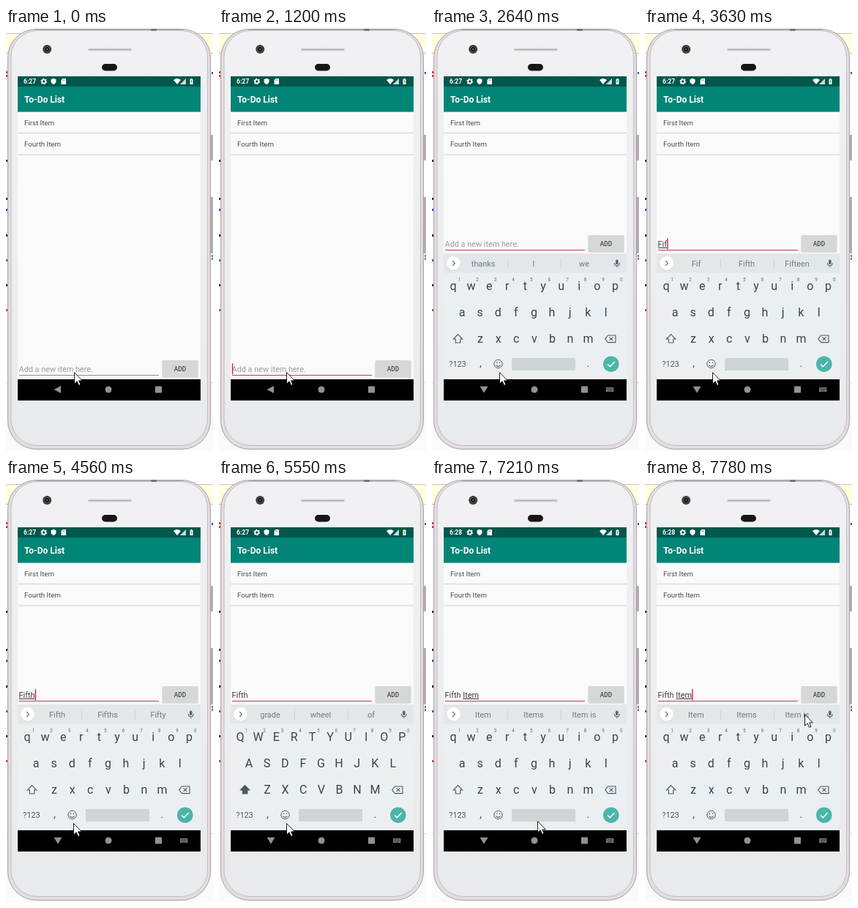
Write an HTML page that moves like this. It is 283 px wide and 578 px high and loops after 8000 ms.

```html
<!DOCTYPE html>
<html lang="en">
<head>
<meta charset="utf-8">
<title>To-do list on a phone</title>
<style>
  html, body { margin: 0; width: 100%; height: 100%; overflow: hidden; background: #fff; }
  svg { display: block; width: 100%; height: 100%; font-family: Roboto, "Open Sans", sans-serif; }
  text { white-space: pre; }
  .mid { text-anchor: middle; }
  .word { text-decoration: underline; }
</style>
</head>
<body>
<svg id="stage" viewBox="0 0 283 578">
  <defs>
    <linearGradient id="shell" x2="0" y2="1">
      <stop offset="0" stop-color="#f1f1f3"/>
      <stop offset="1" stop-color="#e8eaec"/>
    </linearGradient>
  </defs>

  <!-- page behind the phone -->
  <rect y="8" width="283" height="26" fill="#ffffdf"/>
  <path d="M0 7.5H283M0 34.5H283" stroke="#c4c1c1"/>
  <rect y="485" width="283" height="93" fill="#fafafb"/>
  <path d="M0 484.5H283" stroke="#d8d8da"/>
  <g id="scraps"></g>

  <!-- phone -->
  <path d="M281.500 146V181M281.500 231V308" stroke="#b3adb1" stroke-width="3"/>
  <rect x="2.500" y="1.500" width="277" height="574" rx="39" fill="#e2dde0" stroke="#a79fa4"/>
  <rect x="7" y="3.500" width="268.500" height="567" rx="36" fill="url(#shell)" stroke="#c4bcc1"/>
  <path d="M40 2.500H243" stroke="#b4adb1"/>
  <rect x="198" y="1" width="8" height="3" rx="1" fill="#77747a"/>
  <circle cx="56.200" cy="29" r="6" fill="#3a3a3d"/>
  <circle cx="56.200" cy="29" r="3.600" fill="#151519" stroke="#63636a" stroke-width=".8"/>
  <circle cx="56.200" cy="29" r="1.200" fill="#5b6070"/>
  <rect x="112" y="27.500" width="60" height="4" rx="2" fill="#d4d3d6"/>
  <path d="M113 29.500H171" stroke="#aaa9ae"/>
  <rect x="131" y="49" width="21" height="9.500" rx="4.700" fill="#161618"/>

  <!-- app -->
  <rect x="16" y="66" width="250" height="443" fill="#fafafa"/>
  <rect x="16" y="80" width="250" height="34.600" fill="#008577"/>
  <rect x="16" y="66" width="250" height="14" fill="#00574b"/>
  <text id="clock" x="24" y="76" font-size="8.500" font-weight="700" fill="#fff"></text>
  <g fill="#fff">
    <circle cx="51.700" cy="73" r="2.500" fill="none" stroke="#fff" stroke-width="1.700"/>
    <circle cx="51.700" cy="73" r="3.700" fill="none" stroke="#fff" stroke-width="1.200" stroke-dasharray="1.900 1.970"/>
    <path d="M65 68.800l3.500 1.400v2.600q0 3-3.500 4.400q-3.500-1.400-3.500-4.400v-2.600z"/>
    <path d="M77.500 69H82v8h-6.500v-6z"/>
    <path d="M229 71q5-3.800 10 0l-5 6z"/>
    <path d="M246 69v8h-8z" opacity=".8"/>
    <path d="M251.500 70h1v-1h2v1h1v7h-4z"/>
  </g>
  <path d="M78 70.300v1.500M79.500 70.300v1.500M253.500 71.500v3" stroke="#00574b" stroke-width=".8"/>
  <text x="25" y="102" font-size="12" font-weight="700" fill="#fff">To-Do List</text>
  <g font-size="9.700" fill="#4b4b4b">
    <text x="25" y="132.500">First Item</text>
    <text x="25" y="162.300">Fourth Item</text>
  </g>
  <path d="M16 143.500H266M16 173.200H266" stroke="#d9d9d9" stroke-width="1.300"/>

  <g id="entry">
    <text id="hint" x="17.600" y="469.800" font-size="10.850" fill="#9b9b9b">Add a new item here.</text>
    <text id="typed" x="17.600" y="469.800" font-size="10.850" fill="#3c3c3c"><tspan id="done"></tspan><tspan id="word" class="word"></tspan></text>
    <path id="line" d="M18 474.500H209"/>
    <rect id="caret" y="458.300" width="1.400" height="15" fill="#d81b60"/>
    <rect x="213.500" y="454.800" width="49" height="23" rx="1.500" fill="#bdbdbd" opacity=".6"/>
    <rect x="213.500" y="454" width="49" height="23" rx="1.500" fill="#d6d7d7"/>
    <text class="mid" x="238" y="468.900" font-size="8.300" font-weight="500" fill="#444">ADD</text>
  </g>

  <!-- navigation bar -->
  <rect x="16" y="480" width="250" height="29" fill="#000"/>
  <g fill="#929292">
    <path id="back" d="M65.500 494l9.500-5v10z"/>
    <path id="down" d="M65.500 489.800h11l-5.500 9z"/>
    <circle cx="140" cy="494" r="4.500"/>
    <rect x="204" y="489.500" width="9" height="9" rx=".6"/>
    <g id="switcher">
      <rect x="238" y="491" width="10.500" height="6" rx=".6" fill="#777"/>
      <path d="M239.200 492.700h8.500M239.200 494.200h8.500M241 495.800h4.500" stroke="#000" stroke-width=".7" stroke-dasharray="1 .6"/>
    </g>
  </g>

  <g id="board">
    <rect x="16" y="308" width="250" height="172" fill="#eceff1"/>
    <rect x="16" y="308" width="250" height="26.500" fill="#e4e7e9"/>
    <circle cx="29.500" cy="322" r="9.500" fill="#d5d8da"/>
    <circle cx="29.500" cy="321.400" r="9.300" fill="#fff"/>
    <path d="M28 318l3.300 3.400l-3.300 3.400" fill="none" stroke="#5d666b" stroke-width="1.100"/>
    <path d="M103.500 315v14M176.500 315v14" stroke="#d0d4d6"/>
    <g id="tips" class="mid" font-size="10.900" fill="#70797e"></g>
    <rect x="251" y="316.500" width="3.600" height="6.500" rx="1.800" fill="#5d666b"/>
    <path d="M249.300 321q0 3.700 3.500 3.700t3.500-3.700M252.800 324.700v2.300" fill="none" stroke="#5d666b" stroke-width="1.100"/>
    <g id="keys" class="mid" font-size="16" fill="#37444b"></g>
    <path id="shift" d="M35.500 418.600l6.200 6.400h-3v5h-6.400v-5h-3z" stroke="#4b585f" stroke-width="1.100"/>
    <path d="M240.500 420h10.500v9.600h-10.500l-3.800-4.800zM242.500 422.400l5 4.800M247.500 422.400l-5 4.800" fill="none" stroke="#4b585f" stroke-width="1.100"/>
    <g class="mid" fill="#4b585f">
      <text x="35" y="463" font-size="10.900">?123</text>
      <text x="66.500" y="463" font-size="15">,</text>
      <text x="213.500" y="463" font-size="15">.</text>
    </g>
    <g fill="none" stroke="#4b585f">
      <circle cx="90.500" cy="459" r="5.700"/>
      <path d="M87.500 460.700q3 3.400 6 0M88.500 456.500v1.600M92.500 456.500v1.600" stroke-width="1.100"/>
    </g>
    <rect x="109" y="451" width="87" height="17" rx="1.500" fill="#cfd4d6"/>
    <circle cx="244.800" cy="459.200" r="10.800" fill="#4cb5a9"/>
    <path d="M240 459.400l3.300 3.300l6.500-6.600" fill="none" stroke="#fff" stroke-width="1.400"/>
  </g>

  <path id="mouse" d="M.5.700V16.200L4.100 12.800L6.600 18.400L9 17.300L6.600 11.900H11.300Z" fill="#fff" stroke="#000" stroke-width=".9"/>
</svg>

<script>
const LOOP = 8000;
const $ = id => document.getElementById(id);

function add(parent, tag, attrs, text = "") {
  const el = document.createElementNS("http://www.w3.org/2000/svg", tag);
  for (const k in attrs) el.setAttribute(k, attrs[k]);
  el.textContent = text;
  parent.append(el);
  return el;
}

// Slivers of page text that show beside the phone: x, y, colour
[[0, 59, "#d33"], [0, 64, "#d33"], [0, 180, "#333"], [0, 232, "#333"],
 [0, 247, "#44c"], [0, 282, "#222"], [0, 316, "#36b"], [0, 350, "#333"],
 [0, 384, "#c44"], [281, 60, "#44c"], [281, 310, "#3a8fd0"], [281, 314, "#d55"]]
  .forEach(([x, y, fill]) => add($("scraps"), "rect", { x, y, width: 2, height: 3, fill }));

const letters = [];
["qwertyuiop", "asdfghjkl", "zxcvbnm"].forEach((row, r) => {
  [...row].forEach((ch, i) => {
    const x = [29, 41, 66][r] + i * 24.600, y = 358.200 + r * 36;
    letters.push(add($("keys"), "text", { x, y }, ch));
    if (!r) add($("keys"), "text", { x: x + 8.300, y: 346.300, "font-size": 6.300, fill: "#5b676d" }, (i + 1) % 10);
  });
});
const tips = [70, 139, 208].map(x => add($("tips"), "text", { x, y: 325.700 }));

const start = {
  mouse: [93, 470], clock: "6:27", focus: 0, caret: 0, nav: 0, board: 0, up: 0,
  caps: 0, done: "", word: "", tips: ["thanks", "I", "we"], fade: 1
};
const type = (word, ...tips) => ({ word, caret: 1, fade: 1, ...(tips.length && { tips }) });

const steps = [
  [650, { mouse: [92, 470] }],
  [1080, { focus: .5 }],
  [1200, { focus: 1, caret: 1 }],
  [1320, { nav: 1 }],
  [1470, { up: 1, board: .8 }],
  [1620, { board: 1, caret: 0 }],
  [2080, { caret: 1 }],
  [2640, { caret: 0 }],
  [2760, { ...type("F"), fade: .5 }],
  [2920, { tips: ["F", "For", "From"], fade: 1 }],
  [3230, type("Fi", "Fi", "Find", "First")],
  [3630, type("Fif", "Fif", "Fifth", "Fifteen")],
  [4180, type("Fift")],
  [4310, { tips: ["Fift", "Fifth", "Fifteen"] }],
  [4560, type("Fifth", "Fifth", "Fifths", "Fifty")],
  [5020, { ...type("", "grade", "wheel", "of"), done: "Fifth " }],
  [5400, { caret: 0 }],
  [5550, { caps: 1 }],
  [5700, { ...type("I", "I", "I'm", "In"), caps: 0 }],
  [5820, { clock: "6:28" }],
  [5970, type("It", "It", "I", "It's")],
  [6370, type("Ite", "Ite", "It", "Items")],
  [6620, type("Item", "Item", "Items", "Item is")],
  [7060, { caret: 0 }],
  [7210, { mouse: [144, 467] }],
  [7360, { mouse: [183, 470] }],
  [7510, { mouse: [222, 470] }],
  [7660, { caret: 1, mouse: [221, 398] }],
  [7780, { mouse: [218, 321] }]
];

const show = (id, on) => $(id).setAttribute("visibility", on ? "visible" : "hidden");
const move = (id, x, y) => $(id).setAttribute("transform", `translate(${x} ${y})`);

function draw(s) {
  move("mouse", ...s.mouse);
  move("entry", 0, s.up ? -171 : 0);
  move("board", 0, s.board < 1 ? 9 : 0);
  $("board").setAttribute("opacity", s.board);
  $("clock").textContent = s.clock;
  $("done").textContent = s.done;
  $("word").textContent = s.word;
  show("hint", !(s.done + s.word));
  show("caret", s.caret);
  $("caret").setAttribute("x", 17.800 + (s.done + s.word ? $("typed").getComputedTextLength() : 0));
  $("line").setAttribute("stroke", ["#8d8d8d", "#b05a7c", "#c2366a"][s.focus * 2]);
  $("line").setAttribute("stroke-width", s.focus ? 1.200 : 1);
  show("back", !s.nav);
  show("down", s.nav);
  show("switcher", s.nav);
  $("shift").setAttribute("fill", s.caps ? "#4b585f" : "none");
  letters.forEach(el => {
    el.textContent = s.caps ? el.textContent.toUpperCase() : el.textContent.toLowerCase();
  });
  $("tips").setAttribute("opacity", s.fade);
  tips.forEach((el, i) => { el.textContent = s.tips[i]; });
}

let last = -1;
function frame() {
  const t = performance.now() % LOOP;
  const past = steps.filter(([at]) => at <= t);
  if (past.length !== last) {
    last = past.length;
    draw(Object.assign({}, start, ...past.map(p => p[1])));
  }
  requestAnimationFrame(frame);
}
frame();
</script>
</body>
</html>
```
